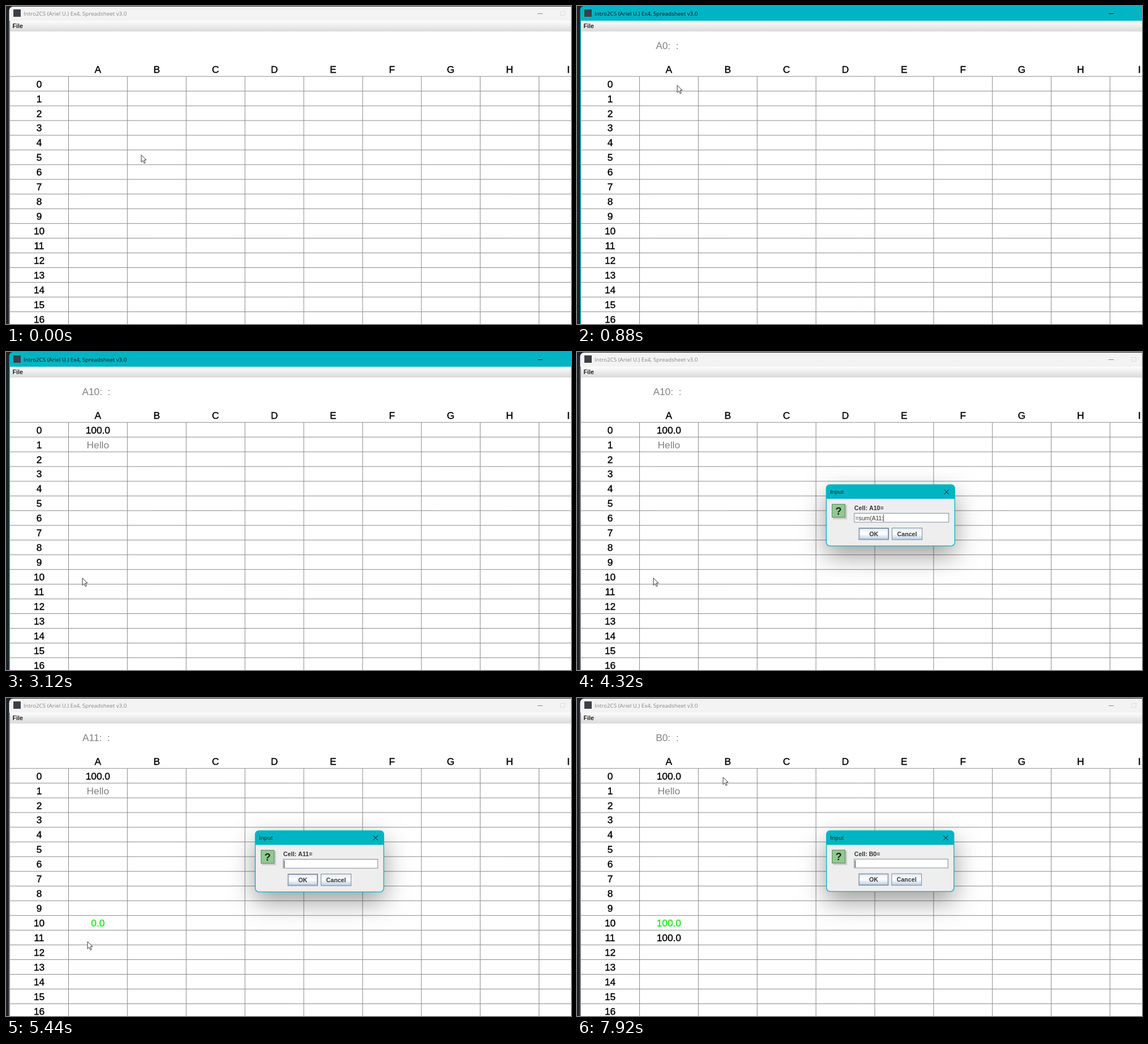
These frames come from a looping animation (998x561 px, 8000 ms). An HTML page with a canvas:

```html
<!DOCTYPE html>
<html lang="en">
<head>
<meta charset="utf-8">
<title>Spreadsheet</title>
<style>
  html, body { margin: 0; width: 100%; height: 100%; overflow: hidden; background: #fff; }
  canvas { display: block; }
</style>
</head>
<body>
<canvas id="stage" width="998" height="561"></canvas>
<script>
const ctx = document.getElementById('stage').getContext('2d');
const LOOP = 8000, STEP = 80;
const COL = 103.88, ROW = 25.95, LEFT = 6.6, TOP = 124.2;
const TEAL = '#00b4c4';
const ARIAL = '"Liberation Sans", Arial, sans-serif';
const UI = '9.8px "Open Sans", "Noto Sans", sans-serif';
const CELL = '17.3px ' + ARIAL, BOLD = 'bold 10.7px ' + ARIAL, FIELD = '10.4px ' + ARIAL;

// Each edit: label click, dialog opening, typing ("<" is backspace), dialog closing
const edits = [
  { name: 'A0', click: 800, open: 880, type: 1000, pace: 40, keys: '100', close: 1160 },
  { name: 'A1', click: 1280, open: 1280, type: 1360, pace: 80, keys: 'Hekk<<llo', close: 2160 },
  { name: 'A10', click: 3040, open: 3160, type: 3600, pace: 90, keys: '=sum(A11:A12)', close: 4800 },
  { name: 'A11', click: 5120, open: 5200, type: 5600, pace: 120, keys: '100', close: 6080 },
  { name: 'B0', click: 7680, open: 7760, type: 9000, pace: 80, keys: '', close: 9000 }
];

const pointer = [
  [80, 238.5, 262], [720, 176.5, 139], [1160, 176.5, 139], [1280, 159, 166],
  [2160, 159, 166], [2800, 134.5, 398], [4800, 134.5, 398], [5040, 143.5, 429],
  [6080, 143.5, 429], [6160, 150, 412], [7040, 188, 240], [7120, 188, 240],
  [7600, 257.5, 139]
];

const clamp = v => Math.max(0, Math.min(1, v));
const ease = v => v * v * (3 - 2 * v);

function rect(x, y, w, h, fill) {
  ctx.fillStyle = fill;
  ctx.fillRect(x, y, w, h);
}

function rounded(x, y, w, h, radii, fill) {
  ctx.fillStyle = fill;
  ctx.beginPath();
  ctx.roundRect(x, y, w, h, radii);
  ctx.fill();
}

function frame(x, y, w, h, color, width = 1) {
  ctx.strokeStyle = color;
  ctx.lineWidth = width;
  ctx.strokeRect(x, y, w, h);
}

function line(x1, y1, x2, y2, color, width = 1) {
  ctx.strokeStyle = color;
  ctx.lineWidth = width;
  ctx.beginPath();
  ctx.moveTo(x1, y1);
  ctx.lineTo(x2, y2);
  ctx.stroke();
}

function text(str, x, y, font, color, align = 'left') {
  ctx.font = font;
  ctx.textAlign = align;
  ctx.fillStyle = color;
  ctx.fillText(str, x, y);
}

function heavy(str, x, y, color = '#000') {
  text(str, x, y, CELL, color, 'center');
  ctx.strokeStyle = color;
  ctx.lineWidth = 0.4;
  ctx.strokeText(str, x, y);
}

function shade(y1, y2, ...colors) {
  const g = ctx.createLinearGradient(0, y1, 0, y2);
  colors.forEach((c, i) => g.addColorStop(i / (colors.length - 1), c));
  return g;
}

const colX = c => 162.3 + c * COL;
const rowY = r => 143.6 + r * ROW;

function drawWindow(active) {
  rect(0, 0, 998, 561, '#1f2229');
  rounded(5.5, active ? 0 : 1, 1010, 580, 7, active ? TEAL : '#f3f3f3');
  rect(7, 26, 991, 19, shade(26, 45, '#fdfdfd', '#dadada'));
  rect(7, 45, 991, 516, '#fff');
  line(6.5, 26, 6.5, 561, active ? TEAL : '#777');

  const ink = active ? '#04191c' : '#868686';
  rect(13, 6, 13, 13, '#3b4045');
  text('Intro2CS (Ariel U.) Ex4, Spreadsheet v3.0', 31, 16.5, UI, ink);
  line(939, 13.5, 948, 13.5, ink);
  frame(979.5, 9.5, 8, 7, active ? '#1badbb' : '#dedede');
  text('File', 11.5, 39, BOLD, '#222');
}

function drawGrid() {
  for (let r = 0; r < 17; r++) {
    const y = TOP + r * ROW;
    line(7, y, 998, y, '#8a8a8a');
    heavy(r, 58.5, rowY(r));
  }
  for (let c = 1; c < 10; c++) {
    const x = LEFT + c * COL;
    line(x, TOP, x, 561, '#8a8a8a');
  }
  [...'ABCDEFGHI'].forEach((ch, c) => heavy(ch, colX(c), 117.5));
}

function drawValues(t) {
  const done = i => t >= edits[i].close;
  if (done(0)) heavy('100.0', colX(0), rowY(0));
  if (done(1)) text('Hello', colX(0), rowY(1), CELL, '#808080', 'center');
  if (done(2)) heavy(done(3) ? '100.0' : '0.0', colX(0), rowY(10), '#1ee61e');
  if (done(3)) heavy('100.0', colX(0), rowY(11));
}

function typed(e, t) {
  const n = Math.max(0, Math.floor((t - e.type) / e.pace) + 1);
  return [...e.keys.slice(0, n)].reduce((s, k) => k === '<' ? s.slice(0, -1) : s + k, '');
}

function button(x, w, label, thick) {
  rect(x, 310, w, 21.5, shade(310, 331, '#e3ebf3', '#fff', '#b9cee2'));
  frame(x + 0.5, 310.5, w - 1, 20.5, '#7a8a99');
  if (thick) frame(x + 1.5, 311.5, w - 3, 18.5, '#8fa3b8');
  text(label, x + w / 2, 325, BOLD, '#333', 'center');
}

function drawDialog(e, t) {
  const p = clamp((t - e.open) / 180);
  if (p === 0) return;
  const scale = 1 - 0.07 * (1 - p);
  ctx.save();
  ctx.globalAlpha = clamp(p * 1.15);
  ctx.translate(480, 245);
  ctx.scale(scale, scale);
  ctx.translate(-480, -245);

  ctx.save();
  ctx.shadowColor = 'rgba(0,0,0,.38)';
  ctx.shadowBlur = 44;
  ctx.shadowOffsetY = 17;
  rounded(439.7, 233.5, 228.2, 109.3, 7, TEAL);
  ctx.restore();
  rounded(441, 259, 225.6, 82.5, [0, 0, 6, 6], '#eeeeee');

  text('Input', 447, 250, UI, '#04191c');
  line(648.5, 242.5, 657, 251, '#012');
  line(657, 242.5, 648.5, 251, '#012');

  rect(452, 270, 25, 25, '#c9cbc9');
  rect(450, 268, 24, 24, '#94c794');
  frame(450.5, 268.5, 23, 23, '#5c8f5c');
  text('?', 462, 286.5, 'bold 18px ' + ARIAL, '#0c2a0c', 'center');

  text('Cell: ' + e.name + '=', 489.8, 279, BOLD, '#333');
  rect(489, 284, 168, 17, '#fff');
  frame(489.7, 284.5, 167, 15.7, '#7a8a99');
  const str = typed(e, t);
  text(str, 491.5, 297, FIELD, '#333');
  const caret = 491.5 + ctx.measureText(str).width;
  line(caret, 286.5, caret, 299.5, '#333');

  button(497.5, 53.5, 'OK', true);
  button(556, 54, 'Cancel', false);
  ctx.restore();
}

const arrow = new Path2D('M.5 .8V13.5L3.4 10.7L5.6 15.5L7.6 14.6L5.5 9.9L9.5 9.6Z');

function drawPointer(t) {
  let i = pointer.findIndex(k => k[0] > t);
  if (i < 0) i = pointer.length;
  const a = pointer[Math.max(0, i - 1)], b = pointer[Math.min(i, pointer.length - 1)];
  const p = b[0] > a[0] ? ease(clamp((t - a[0]) / (b[0] - a[0]))) : 0;
  ctx.save();
  ctx.translate(a[1] + (b[1] - a[1]) * p, a[2] + (b[2] - a[2]) * p);
  ctx.fillStyle = '#fff';
  ctx.strokeStyle = '#2a2a2a';
  ctx.lineWidth = 0.95;
  ctx.fill(arrow);
  ctx.stroke(arrow);
  ctx.restore();
}

function draw(now) {
  const t = Math.floor(now % LOOP / STEP) * STEP;
  const e = edits.find(e => t >= e.click && t < e.close);
  drawWindow(t >= edits[0].click && !(e && t > e.open));
  drawGrid();
  drawValues(t);
  if (e) {
    text(e.name + ':  :', 159.4, 76, CELL, '#808080', 'center');
    drawDialog(e, t);
  }
  drawPointer(t);
}

let start;
function tick(now) {
  start ??= now;
  draw(now - start);
  requestAnimationFrame(tick);
}
requestAnimationFrame(tick);
</script>
</body>
</html>
```
